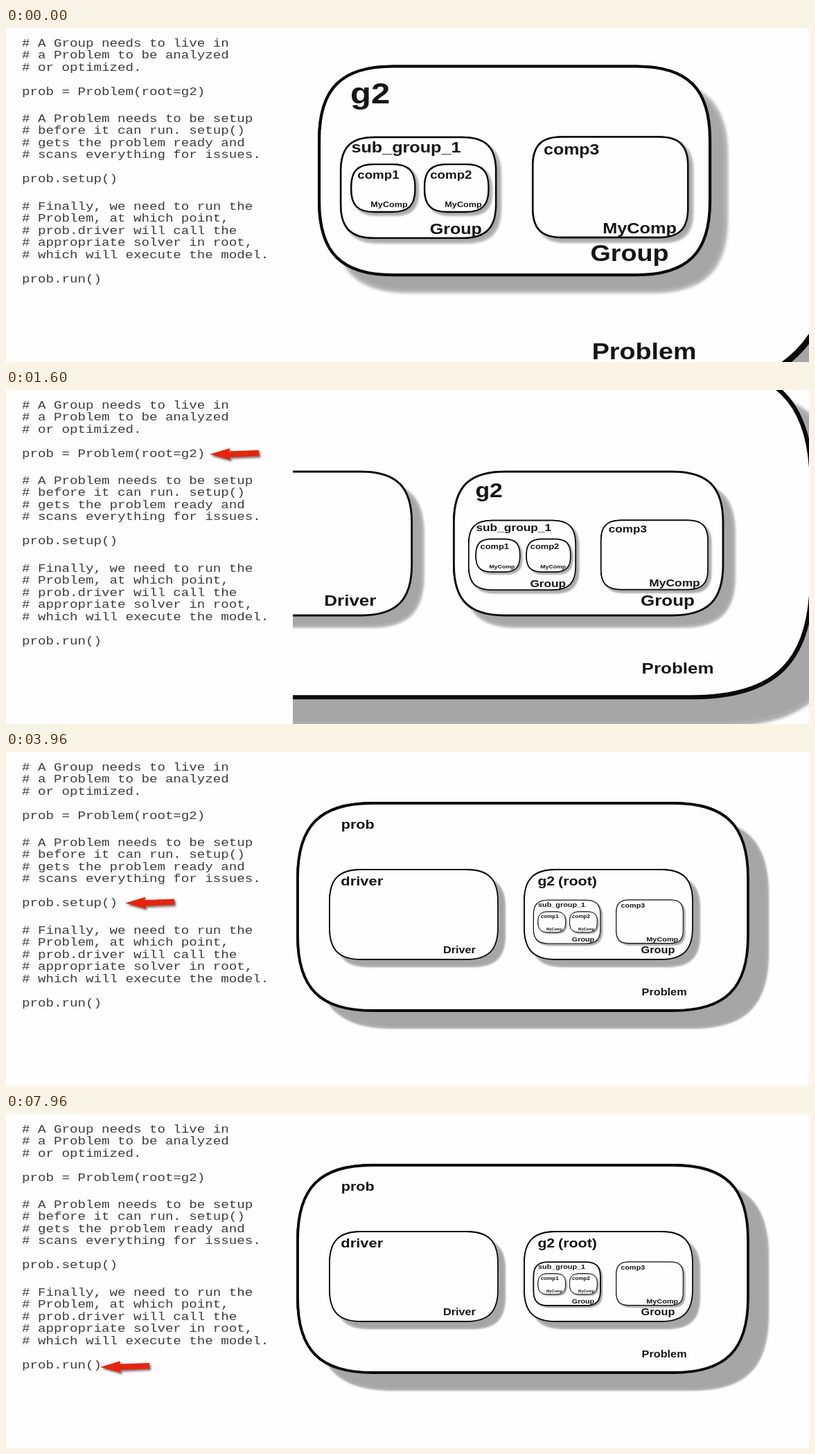
An HTML page with a canvas that plays this animation: 1159x483 px, repeating every 8000 ms.

```html
<!DOCTYPE html>
<html lang="en">
<head>
<meta charset="utf-8">
<style>
html, body { margin: 0; width: 1159px; height: 483px; overflow: hidden; background: #fefefe; }
canvas { display: block; }
</style>
</head>
<body>
<canvas id="stage" width="1159" height="483"></canvas>
<script>
const ctx = document.getElementById('stage').getContext('2d');
const LOOP = 8000, STEP = 40, ZOOM_START = 1280, ZOOM_END = 1800;
const INK = '#0a0a0a', PAPER = '#fefefe';

// Each block: first baseline, then its lines.
const code = [
  [27, '# A Group needs to live in', '# a Problem to be analyzed', '# or optimized.', '', 'prob = Problem(root=g2)'],
  [136, '# A Problem needs to be setup', '# before it can run. setup()', '# gets the problem ready and',
    '# scans everything for issues.', '', 'prob.setup()'],
  [263, '# Finally, we need to run the', '# Problem, at which point,', '# prob.driver will call the',
    '# appropriate solver in root,', '# which will execute the model.', '', 'prob.run()']
];

// x, y, width, height, corner, line, shadow x, shadow y, blur
const boxes = {
  prob: [421, 74, 650, 300, 108, 3.8, 28, 24, 3],
  driver: [467, 170, 243, 130, 46, 1.8, 10, 10, 2.4],
  g2: [748, 170, 243, 130, 46, 1.8, 10, 10, 2.4],
  sub: [761.4, 214.2, 96.5, 62.8, 21, 1.1, 2.6, 2.6, 1.6],
  comp1: [767.9, 231, 39.7, 29.7, 14, 1, 1.8, 1.8, 1.4],
  comp2: [813.5, 231, 39.8, 29.7, 14, 1, 1.8, 1.8, 1.4],
  comp3: [880.8, 214, 96.5, 62.6, 18, 1.1, 2.6, 2.6, 1.6]
};

// text, x, baseline, size
const labels = [
  ['Problem', 917.6, 352.4, 14], ['Driver', 631, 291, 14], ['Group', 916.6, 291.2, 14],
  ['g2', 767.4, 193, 18.2], ['sub_group_1', 768, 223.6, 9.35], ['Group', 816.8, 274.4, 9.3],
  ['comp1', 771.8, 240, 6.95], ['comp2', 817, 240, 6.95], ['MyComp', 780, 257.6, 4.7],
  ['MyComp', 826.1, 257.6, 4.7], ['comp3', 887.6, 225, 9.25], ['MyComp', 924.3, 274, 9.4]
];
const lateLabels = [['prob', 483.8, 111, 18.6], ['driver', 483.3, 193, 18.9], ['(root)', 797, 193, 18.5]];

// tip x, tip y, shown from, shown until
const arrows = [[294, 93, 360, 2960], [172, 218.5, 3960, 6920], [136, 366, 7840, LOOP]];

// box, highlighted from, until
const scan = [['prob', 4600, 5880]];
['driver', 'g2', 'sub', 'comp1', 'comp2', 'comp3'].forEach((name, i) =>
  scan.push([name, 5880 + i * 133, 5880 + (i + 1) * 133]));

function text(str, x, y, size, stretch, face) {
  ctx.save();
  ctx.translate(x, y);
  ctx.scale(stretch, 1);
  ctx.font = `${face.replace('SIZE', size + 'px')}`;
  ctx.fillText(str, 0, 0);
  ctx.restore();
}
const label = ([str, x, y, size]) =>
  text(str, x, y, size, 1.16, 'bold SIZE "Liberation Sans", Arial, sans-serif');

function setShadow(color, x = 0, y = 0, blur = 0) {
  ctx.shadowColor = color;
  ctx.shadowOffsetX = x;
  ctx.shadowOffsetY = y;
  ctx.shadowBlur = blur;
}

// Rounded box whose corners are a little fuller than circles.
function boxPath(x, y, w, h, r) {
  const k = r * 0.3, X = x + w, Y = y + h, p = new Path2D();
  p.moveTo(x + r, y);
  p.lineTo(X - r, y);
  p.bezierCurveTo(X - k, y, X, y + k, X, y + r);
  p.lineTo(X, Y - r);
  p.bezierCurveTo(X, Y - k, X - k, Y, X - r, Y);
  p.lineTo(x + r, Y);
  p.bezierCurveTo(x + k, Y, x, Y - k, x, Y - r);
  p.lineTo(x, y + r);
  p.bezierCurveTo(x, y + k, x + k, y, x + r, y);
  p.closePath();
  return p;
}

function drawBox(name, t, scale) {
  const [x, y, w, h, r, line, sx, sy, blur] = boxes[name];
  const path = boxPath(x, y, w, h, r);
  const hit = scan.find(([n, from, to]) => n === name && t >= from && t < to);
  ctx.fillStyle = PAPER;
  ctx.strokeStyle = INK;
  ctx.lineWidth = line;
  setShadow('#a6a6a6', sx * scale, sy * scale, blur * scale);
  ctx.stroke(path);
  ctx.fill(path);
  setShadow('transparent');
  ctx.fill(path);
  if (hit) {
    ctx.strokeStyle = t < hit[1] + STEP ? '#701010' : '#d81414';
    ctx.lineWidth = line + 1.4;
  } else if (name === 'sub' && t >= 6680) {
    ctx.lineWidth = line + 0.7;
  }
  ctx.stroke(path);
}

function drawArrow(x, y) {
  const points = [[0, 0], [29, -8.8], [28.5, -4.6], [71, -6], [71.5, 2.6], [29, 4.2], [30, 8.2]];
  ctx.beginPath();
  points.forEach(([dx, dy]) => ctx.lineTo(x + dx, y + dy));
  ctx.closePath();
  ctx.fillStyle = '#ea220b';
  setShadow('rgba(0,0,0,.5)', 2, 2.5, 3);
  ctx.fill();
  setShadow('transparent');
}

function draw(t) {
  const u = Math.min(1, Math.max(0, (t - ZOOM_START) / (ZOOM_END - ZOOM_START)));
  const zoomLeft = 1 - u * (0.1 + 1.89 * u - 0.99 * u * u);
  const panLeft = 1 - u * (0.485 + 0.803 * u - 0.288 * u * u);
  const scale = 1 + 1.321 * zoomLeft;

  ctx.fillStyle = PAPER;
  ctx.fillRect(0, 0, 1159, 483);

  ctx.save();
  ctx.beginPath();
  ctx.rect(414, 0, 745, 483);
  ctx.clip();
  ctx.translate(787 - scale * (787 + 105.3 * panLeft), -256.7 * (scale - 1));
  ctx.scale(scale, scale);
  Object.keys(boxes).forEach(name => drawBox(name, t, scale));
  ctx.fillStyle = '#151515';
  labels.forEach(label);
  if (t >= ZOOM_END) lateLabels.forEach(label);
  ctx.restore();

  ctx.fillStyle = '#3c3c3c';
  for (const [top, ...lines] of code)
    lines.forEach((line, i) =>
      text(line, 23, top + i * 17.45, 16, 1.197, 'SIZE "Liberation Mono", "Courier New", monospace'));

  for (const [x, y, from, to] of arrows)
    if (t >= from && t < to) drawArrow(x, y);
}

const start = performance.now();
function tick() {
  const t = (performance.now() - start) % LOOP;
  draw(Math.floor(t / STEP) * STEP);
  requestAnimationFrame(tick);
}
tick();
</script>
</body>
</html>
```
